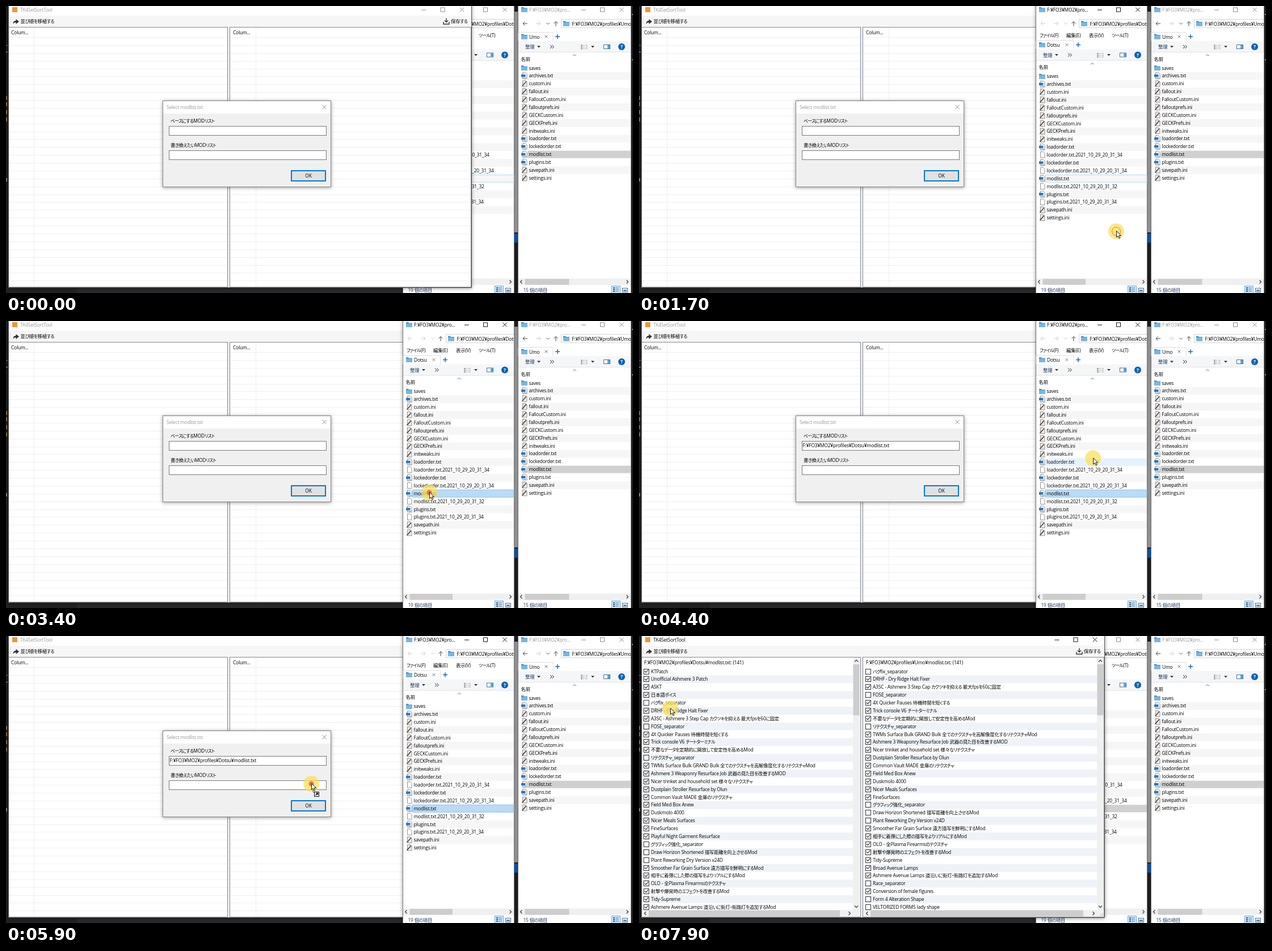
Recreate the animation shown at these times as an HTML page. Size 1105 px wide and 507 px high, loop 8000 ms.

```html
<!DOCTYPE html>
<html lang="ja">
<head>
<meta charset="utf-8">
<title>Mod list sorter</title>
<style>
html, body { margin: 0; width: 100%; height: 100%; overflow: hidden; background: #222225; }
svg { display: block; width: 100%; height: 100%; }
text { font: 8.4px "Open Sans", "Noto Sans CJK JP", "Noto Sans CJK", sans-serif; letter-spacing: -.18px;
  font-feature-settings: "palt"; fill: #000; white-space: pre; }
.k { font-size: 7.8px; letter-spacing: -.6px; }
.cap { fill: #999; }
.btn { stroke: #8a8a8a; fill: none; }
.on .cap { fill: #000; }
.on .btn { stroke: #111; }
.shadow { filter: drop-shadow(0 1px 3px #0006); }
</style>
</head>
<body>
<svg id="stage" viewBox="0 0 1105 507" preserveAspectRatio="none"></svg>
<script>
const PITCH = 13.88;
const rect = (x, y, w, h, fill, extra = '') =>
  `<rect x="${x}" y="${y}" width="${w}" height="${h}" fill="${fill}" ${extra}/>`;
const box = (x, y, w, h, fill, stroke) => rect(x + .5, y + .5, w - 1, h - 1, fill, `stroke="${stroke}"`);
const path = (d, stroke = '#555', fill = 'none', extra = '') =>
  `<path d="${d}" stroke="${stroke}" fill="${fill}" ${extra}/>`;
const text = (x, y, s, extra = '') =>
  `<text x="${x}" y="${y}" ${extra}>${s.replace(/[ぁ-ヿ]+/g, '<tspan class="k">$&</tspan>')}</text>`;
const group = (id, body, extra = '') => `<g id="${id}" ${extra}>${body}</g>`;
const times = (n, f) => Array.from({ length: n }, (_, i) => f(i)).join('');

const drop = (x, y) => path(`M${x - 3} ${y - 1.5}h6l-3 3z`, 'none', '#222');
const chevron = (x, y, dx, dy, color = '#444', w = 1.3) => dx
  ? path(`M${x - dx} ${y - 3}l${2 * dx} 3l${-2 * dx} 3`, color, 'none', `stroke-width="${w}"`)
  : path(`M${x - 3} ${y - dy}l3 ${2 * dy}l3 ${-2 * dy}`, color, 'none', `stroke-width="${w}"`);
const cross = (x, y, r, extra) => `<path d="M${x - r} ${y - r}l${2 * r} ${2 * r}m0 ${-2 * r}l${-2 * r} ${2 * r}" ${extra}/>`;
const folder = (x, y) =>
  path(`M${x} ${y - 4.5}h4l1 1.5h6v7.5h-11z`, 'none', '#4f94c4') + rect(x, y - 2, 11, 6.5, '#79b7de');
const buttons = (right, y) => `<g class="btn">
  <path d="M${right - 88} ${y + .5}h8"/><rect x="${right - 54.5}" y="${y - 3.5}" width="7" height="7"/>
  ${cross(right - 17, y, 3.7, '')}</g>`;

const page = (x, y, fill = '#fff') => path(`M${x + 2.5} ${y - 5.5}h5l2.5 2.5v8h-7.5z`, '#858585', fill, 'stroke-width=".9"');
function fileIcon(name, x, y) {
  if (name === 'saves') return folder(x, y);
  if (name.endsWith('.ini')) return page(x, y, '#ececec') + path(`M${x + 1.5} ${y + 4.5}l7.500 -8.500`, '#5b4a3a', 'none', 'stroke-width="1.7"');
  if (name.endsWith('.txt')) return page(x, y) + rect(x, y - 2.5, 7.5, 4.5, '#2f78b7') + path(`M${x + 4} ${y + 3.5}h5`, '#6aa5d6');
  return page(x, y);
}

const files = ('saves archives.txt custom.ini fallout.ini FalloutCustom.ini falloutprefs.ini GECKCustom.ini ' +
  'GECKPrefs.ini initweaks.ini loadorder.txt lockedorder.txt modlist.txt plugins.txt savepath.ini settings.ini').split(' ');
const backups = { 'loadorder.txt': 34, 'lockedorder.txt': 34, 'modlist.txt': 32, 'plugins.txt': 34 };
const withBackups = files.flatMap(f => backups[f] ? [f, `${f}.2021_10_29_20_31_${backups[f]}`] : [f]);

// Two file browser windows; top is the first row's centre.
const browsers = {
  base: { x: 699, w: 197, tabY: 68, top: 124.3, files: withBackups, name: 'Dotsu', menu: true },
  dest: { x: 902, w: 200, tabY: 53.5, top: 109.5, files, name: 'Umo' },
};

function browser(id, { x, w, tabY, top, files, name, menu }) {
  const r = x + w, barY = tabY + 18.5;
  const back = menu ? '#ccc' : '#444';
  const arrow = (cx, d, color) => path(`M${cx - 4 * d} 31h${8 * d}m${-3.5 * d} -3.5l${3.5 * d} 3.5l${-3.5 * d} 3.5`, color);
  let s = rect(x, -5, w, 517, '#fff', 'class="shadow"') + path(`M${x + .5} 0V507M${r - .5} 0V507`, '#777');
  s += folder(x + 6, 6.5) + text(x + 20, 10, 'F:¥FO3¥MO2¥pro...', 'class="cap"') + buttons(r, 6.5);
  s += arrow(x + 13, -1, back) + arrow(x + 36, 1, '#ccc') + chevron(x + 53, 31, 0, 1.2, menu ? '#ccc' : '#666', 1);
  s += path(`M${x + 67} 35.5v-8m-3.5 3.5l3.5 -3.5l3.5 3.5`, '#444');
  s += path(`M${r - 1} 23.5H${x + 76.5}V38.5H${r - 1}`, '#d4d4d4') + folder(x + 80, 31);
  s += `<clipPath id="${id}Clip"><rect x="${x}" y="0" width="${w - 1}" height="507"/></clipPath>`;
  s += text(x + 95.5, 34.5, `F:¥FO3¥MO2¥profiles¥${name}`, `clip-path="url(#${id}Clip)"`);
  if (menu) ['ファイル(F)', '編集(E)', '表示(V)', 'ツール(T)'].forEach((m, i) => s += text(x + [7, 54, 94, 134][i], 54.5, m));
  const tabW = menu ? 66 : 61;
  s += path(`M${x + 1} ${tabY + 8}v-15h${tabW}v15`, '#ddd', '#fff') + folder(x + 6, tabY + .5) + text(x + 20, tabY + 4, name);
  s += cross(x + tabW - 11, tabY + .5, 2.4, 'stroke="#777"');
  s += path(`M${x + tabW + 5} ${tabY + .5}h8m-4 -4v8`, '#1f67b1', 'none', 'stroke-width="1.5"');
  s += rect(x + 1, barY - 10, w - 2, 20, '#f5f6f7') + path(`M${x + 1} ${barY + 9.5}H${r - 1}`, '#e3e4e6');
  s += text(x + 13, barY + 3.3, '整理', 'style="fill:#1e395b"') + drop(x + 37, barY);
  s += chevron(x + 58.5, barY, 1.4, 0, '#222', 1) + chevron(x + 62, barY, 1.4, 0, '#222', 1);
  s += times(3, i => rect(r - 89, barY - 3.5 + i * 3, 3, 2, '#999') + rect(r - 85, barY - 3 + i * 3, 2.5, 1, '#aaa') + rect(r - 81, barY - 3 + i * 3, 4, 1, '#aaa'));
  s += drop(r - 68, barY) + box(r - 49, barY - 4, 12, 8, '#fff', '#456f98') + rect(r - 42, barY - 3, 4, 6, '#58a5dd');
  s += `<circle cx="${r - 17}" cy="${barY}" r="6" fill="#0b62b5"/>` +
    text(r - 17, barY + 3.2, '?', 'text-anchor="middle" style="fill:#fff;font-weight:700"');
  s += text(x + 5.5, top - 13, '名前') + chevron(x + 100, top - 22.5, 0, -1.2, '#777', 1);
  s += files.map((f, i) => i % 2 ? rect(x + 6, top - 6.9 + i * PITCH, w - 7, PITCH, '#f6f6f6') : '').join('');
  s += rect(x + 17, 0, w - 18, 13, 'none', `id="${id}Hover"`) + rect(x + 17.5, 0, w - 18.5, 13, 'none', `id="${id}Pick"`);
  s += files.map((f, i) => {
    const y = top + i * PITCH;
    return fileIcon(f, x + 6, y) + text(x + 19.5, y + 3, f);
  }).join('');
  s += rect(x + 1, 481.5, w - 2, 11.5, '#f0f0f0') + rect(x + 12.5, 482, menu ? 75.5 : 78, 10.5, '#cdcdcd');
  s += chevron(x + 6, 487.3, -1.5, 0) + chevron(r - 7, 487.3, 1.5, 0) + text(x + 9.5, 505, `${files.length} 個の項目`, 'style="fill:#1e395b"');
  s += box(r - 35, 494, 16, 14, '#cce8ff', '#5fb2e8');
  s += times(3, i => rect(r - 32, 497 + i * 3, 3, 2, '#456') + rect(r - 28, 497.5 + i * 3, 6, 1, '#678'));
  s += box(r - 16, 498, 10, 8, '#fff', '#567') + rect(r - 14, 501, 6, 3, '#4b8fc4');
  return group(id, s);
}

// A leading "-" marks an unticked entry.
const leftMods = `KTPatch|Unofficial Ashmere 3 Patch|ASKT|日本語ボイス|-バグfix_separator|DRHF - Dry Ridge Halt Fixer
A3SC - Ashmere 3 Step Cap カクツキを抑える 最大fpsを60に固定|-FOSE_separator|4X Quicker Pauses 待機時間を短くする
Trick console V6 チートターミナル|不要なデータを定期的に開放して安定性を高めるMod|-リテクスチャ_separator
TWMs Surface Bulk GRAND Bulk 全てのテクスチャを高解像度化するリテクスチャMod
Ashmere 3 Weaponry Resurface Job 武器の見た目を改善するMOD|Nicer trinket and household set 様々なリテクスチャ
Dustplain Stroller Resurface by Olun|Common Vault MADE 金庫のリテクスチャ|Field Med Box Anew|Duskmolo 4000
Nicer Meals Surfaces|FineSurfaces|Playful Night Garment Resurface|-グラフィック強化_separator
-Draw Horizon Shortened 描写距離を向上させるMod|-Plant Reworking Dry Version v24D
Smoother Far Grain Surface 遠方描写を鮮明にするMod|相手に着弾にした際の描写をよりリアルにするMod
OLO - 全Plasma Firearmsのテクスチャ|射撃や爆発時のエフェクトを改善するMod|Tidy-Supreme
Ashmere Avenue Lamps 道沿いに街灯・街路灯を追加するMod`.split(/[|\n]/);
const rightMods = leftMods.slice(4, -1).filter(m => !m.startsWith('Playful')).concat('Broad Avenue Lamps', leftMods.at(-1),
  '-Race_separator', 'Conversion of female figures', '-Form 4 Alteration Shape', '-VELTORIZED FORM5 lady shape');

function emptyList(x, r) {
  return rect(x + 1, 38, r - x - 2, 458, '#fff') + text(x + 5, 50, 'Colum...') +
    path(`M${x + 45.5} 38V496` + times(32, i => `M${x + 1} ${Math.round(55 + i * PITCH) + .5}H${r - 1}`), '#efefef');
}

function fullList(x, r, mods, thumbEnd) {
  const inner = r - 13;
  let s = rect(x + 1, 38, r - x - 2, 458, '#fff');
  mods.forEach((m, i) => {
    const y = 62.5 + i * PITCH, off = m[0] === '-';
    if (i % 2) s += rect(x + 3, y - 6.9, inner - x - 3, PITCH, '#eff3f7');
    s += box(x + 4, Math.round(y) - 5, 10, 10, '#fff', '#333');
    if (!off) s += path(`M${x + 6} ${y - .5}l2.2 2.3l4 -4.6`, '#222', 'none', 'stroke-width="1.1"');
    s += text(x + 17, y + 3, off ? m.slice(1) : m);
  });
  s += rect(inner, 38, 12, 458, '#f0f0f0') + rect(x + 1, 484, r - x - 2, 12, '#f0f0f0');
  s += rect(inner + .5, 50, 11, 90, '#cdcdcd') + rect(x + 13, 484.5, thumbEnd - x - 13, 11, '#cdcdcd');
  return s + chevron(inner + 6, 44, 0, -1.5) + chevron(inner + 6, 478, 0, 1.5) + chevron(x + 7, 490, -1.5, 0) + chevron(inner - 6, 490, 1.5, 0);
}

const rawBar = rect(807, 38, 12, 458, '#f4f4f4') + box(807, 38, 12, 12, '#f0f0f0', '#ddd') + box(807, 484, 12, 12, '#f0f0f0', '#ddd') +
  box(807, 50, 12, 96, '#efefef', '#c8c8c8') + path('M807 145.5H818.5V51', '#777') +
  path('M809 46h7l-3.5 -4zM809 488h7l-3.5 4z', 'none', '#000');
const listPath = p => `F:¥FO3¥MO2¥profiles¥${p}¥modlist.txt`;

const mainWindow = rect(4, -5, 817, 503, '#fff', 'class="shadow"') + rect(4, 17, 816, 20, '#f6f6f6') +
  rect(11, 2, 9, 9, '#e59a3c') + text(25, 10, 'TK4SetSortTool', 'class="cap"') + buttons(820.5, 6.5) +
  times(4, i => rect(7, 21 + i * 3, 1, 1, '#aaa')) +
  path('M12.5 32c0 -4 2 -6 5 -6v-3l5.5 4.5l-5.5 4.5v-3c-2.500 0 -4 1 -5 3z', 'none', '#333') + text(25.5, 30, '並び順を移植する') +
  path('M771 28v4h10v-4M776 21.500v7m-3 -3l3 3l3 -3', '#333', 'none', 'stroke-width="1.4"') + text(784, 30, '保存する') +
  rect(391, 37, 4, 460, '#f0f0f0') + box(4, 37, 387, 460, '#fff', '#828790') + box(394, 37, 426, 460, '#fff', '#828790') +
  group('emptyL', emptyList(4, 391)) + group('emptyR', emptyList(395, 820)) + group('rawBar', rawBar) +
  group('fullL', fullList(4, 390, leftMods, 354)) +
  group('fullR', fullList(395, 820, rightMods, 783) + times(3, i => rect(816 - i * 2, 490 + i * 2, 1, 1, '#999') + rect(816, 490 + i * 2, 1, 1, '#999'))) +
  group('rawHead', text(9, 50, 'ColumnHeader')) +
  group('heads', text(9, 50, listPath('Dotsu') + ': (141)') + text(400, 50, listPath('Umo') + ': (141)')) +
  path('M4.5 0V497.500H820.500V0', '#555');

const dialog = rect(276, 167, 297, 153, '#f0f0f0', 'class="shadow"') + rect(277, 168, 295, 22, '#fff') +
  rect(276.5, 167.5, 296, 152, 'none', 'stroke="#888"') + text(283, 182, 'Select modlist.txt', 'class="cap"') +
  `<g class="btn">${cross(561, 178.5, 3.7, '')}</g>` + text(290, 206, 'ベースにするMODリスト') + text(290, 249, '書き換えたいMODリスト') +
  box(287, 212, 278, 17, '#fff', '#7a7a7a') + box(287, 255, 278, 17, '#fff', '#7a7a7a') +
  group('path1', text(288.5, 223, listPath('Dotsu'))) + group('path2', text(288.5, 266, listPath('Umo'))) +
  rect(503, 291, 60, 18, '#e1e1e1', 'stroke="#0078d7" stroke-width="2"') + text(533, 303, 'OK', 'text-anchor="middle"');

const backdrop = rect(0, 0, 1105, 507, '#222225') + rect(125, 499, 574, 8, '#2a2a2d') + rect(896, 10, 6, 390, '#a9a9a9') +
  rect(896, 402, 6, 16, '#0b61b8') + [162, 173, 187, 200].map(y => rect(0, y - 3, 2, 7, '#93703f')).join('') +
  rect(0, 81, 3, 1, '#bbb') + rect(0, 69, 4, 1, '#777') + rect(0, 304, 2, 6, '#888') + rect(1103, 14, 2, 2, '#999') + rect(1103, 94, 2, 2, '#999');

const cursor = '<circle r="14" fill="#fbe05a" opacity=".75"/><circle id="press" r="4.5" fill="#ee5238" opacity=".75"/>' +
  '<circle id="ring" fill="none" stroke="#e8763c"/>' +
  path('M.5 -.5v11l2.600 -2.300l2 4.300l1.800 -.8l-2 -4.200h3.600z', '#000', '#fff', 'stroke-width=".9"') +
  group('link', path('M3 11v4h4', '#222', 'none', 'stroke-dasharray="1.500 1"') + box(5, 14, 9, 9, '#fff', '#111') +
    path('M7.500 20.500l4 -4m-3 0h3v3', '#000', 'none', 'stroke-width="1.3"'));

const stage = document.getElementById('stage');
stage.innerHTML = backdrop + browser('base', browsers.base) + group('main', mainWindow) + group('dialog', dialog) +
  browser('dest', browsers.dest) + group('cursor', cursor);
const $ = id => document.getElementById(id);
const show = (id, on) => $(id).style.display = on ? '' : 'none';

// time, x, y of the pointer
const route = [
  [700, 1000, 525], [1000, 890, 470], [1500, 841, 398], [1700, 841, 398], [2700, 752, 320], [3200, 746, 303],
  [3400, 746, 303], [3600, 690, 285], [4000, 535, 221], [4200, 535, 221], [4500, 893, 250], [4900, 965, 265],
  [5400, 965, 265], [5800, 538, 261], [6100, 538, 261], [6600, 538, 303], [7200, 538, 303], [7800, 55, 128], [8000, 55, 128],
];
const presses = [[1500, 1600], [3300, 4100], [5200, 6000], [6800, 6900]];
const RAISED = 1600, SUBMIT = 6800, CLOSED = 6900, LEFT_READY = 7000, READY = 7200;

function pointer(t) {
  const i = route.findIndex(p => p[0] > t);
  if (i < 1) return [-50, -50];
  const [t0, x0, y0] = route[i - 1], [t1, x1, y1] = route[i];
  const u = (t - t0) / (t1 - t0), e = u * u * (3 - 2 * u);
  return [x0 + (x1 - x0) * e, y0 + (y1 - y0) * e];
}

function paintRows(id, x, y, free, focused, outlined) {
  const b = browsers[id], picked = b.files.indexOf('modlist.txt');
  const rowY = i => b.top - 6.5 + i * PITCH;
  const row = Math.floor((y - b.top + 6.9) / PITCH);
  const over = free && x > b.x && x < b.x + b.w && row >= 0 && row < b.files.length;
  const blue = focused || (over && row === picked);
  const hover = $(id + 'Hover'), pick = $(id + 'Pick');
  hover.setAttribute('y', rowY(row));
  hover.setAttribute('fill', over ? '#e5f3ff' : 'none');
  pick.setAttribute('y', rowY(picked));
  pick.setAttribute('fill', outlined ? 'none' : blue ? '#b9dbf6' : '#d0d0d0');
  pick.setAttribute('stroke', outlined ? '#b5d9f3' : blue ? '#8fc5ee' : 'none');
}

function render(t) {
  const [x, y] = pointer(t);
  const down = presses.some(([a, b]) => t >= a && t < b);
  const age = Math.min(...presses.map(p => t - p[1]).filter(a => a >= 0));
  const baseOn = t >= RAISED && t < SUBMIT;

  stage.insertBefore($('base'), $(baseOn ? 'dest' : 'main'));
  $('base').classList.toggle('on', baseOn);
  $('main').classList.toggle('on', t >= CLOSED);
  $('dialog').classList.toggle('on', t >= SUBMIT);
  show('dialog', t < CLOSED);
  show('path1', t >= 4100);
  show('path2', t >= 6000);
  show('emptyL', t < LEFT_READY);
  show('fullL', t >= LEFT_READY);
  show('rawHead', t >= LEFT_READY && t < READY);
  show('rawBar', t >= LEFT_READY && t < READY);
  show('emptyR', t < READY);
  show('fullR', t >= READY);
  show('heads', t >= READY);

  paintRows('base', x, y, baseOn && !down, baseOn, t < 3300);
  paintRows('dest', x, y, t >= RAISED && !down, false, false);

  // The drop into the first field ends before the pointer returns, so the second press starts late.
  $('cursor').setAttribute('transform', `translate(${x} ${y})`);
  show('press', down);
  show('ring', age < 300);
  $('ring').setAttribute('r', 5 + Math.min(age, 300) / 40);
  show('link', down && x > 287 && x < 565 && t < SUBMIT);
}

// The pointer rests on the row until the press, so its highlight stays blue through 5100 ms.
function tick(now) {
  render(Math.floor(now % 8000 / 100) * 100);
  requestAnimationFrame(tick);
}
render(0);
requestAnimationFrame(tick);
</script>
</body>
</html>
```
